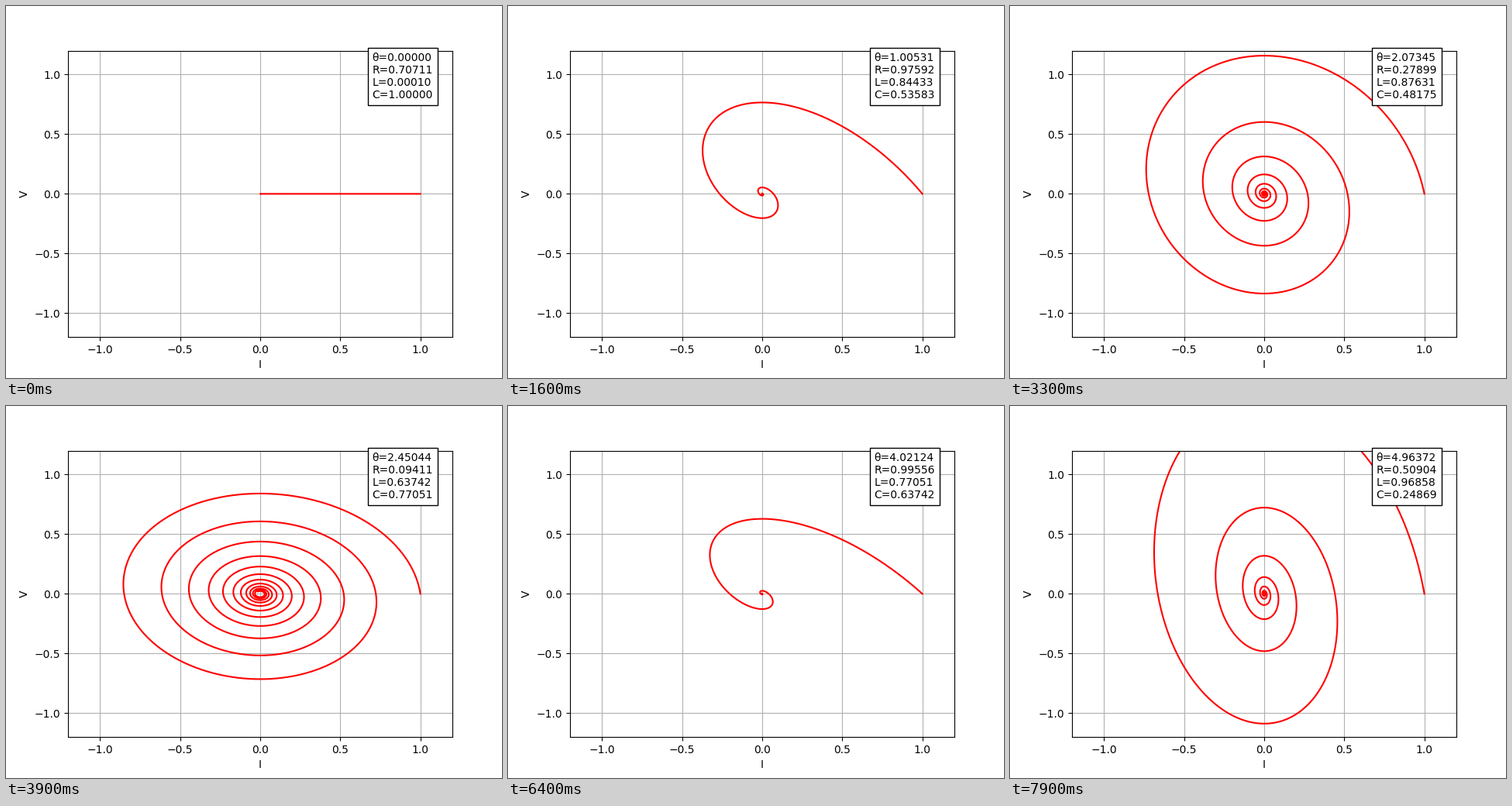
A matplotlib script that plays this animation: 640x480 px, repeating every 8000 ms.

```python
import numpy as np
import matplotlib.pyplot as plt
from matplotlib.animation import FuncAnimation

FRAMES = 80
INTERVAL = 100
STEP = 2 * np.pi / 100
FLOOR = 1e-4

t = np.arange(0, 50, 0.01)


def params(theta):
    """Resistance, inductance and capacitance for a given angle."""
    values = np.sin(theta + np.pi / 4), np.sin(theta), np.cos(theta)
    return [max(abs(v), FLOOR) for v in values]


def response(R, L, C):
    """Current and capacitor voltage of a series RLC circuit, I(0)=1, V(0)=0."""
    alpha = R / (2 * L)
    d = np.sqrt(complex(alpha**2 - 1 / (L * C)))
    r1, r2 = -alpha + d, -alpha - d
    e1, e2 = np.exp(r1 * t), np.exp(r2 * t)
    current = (r1 * e1 - r2 * e2) / (r1 - r2)
    voltage = (e1 - e2) / (C * (r1 - r2))
    return current.real, voltage.real


fig, ax = plt.subplots(figsize=(6.4, 4.8), dpi=100)
ax.set(xlim=(-1.2, 1.2), ylim=(-1.2, 1.2), xlabel="I", ylabel="V")
ax.grid()
curve, = ax.plot([], [], color="red", lw=1.5)
label = ax.text(0.7, 0.8, "", bbox=dict(facecolor="white", edgecolor="black"))


def update(i):
    theta = i * STEP
    R, L, C = params(theta)
    curve.set_data(*response(R, L, C))
    label.set_text(f"θ={theta:.5f}\nR={R:.5f}\nL={L:.5f}\nC={C:.5f}")
    return curve, label


anim = FuncAnimation(fig, update, frames=FRAMES, interval=INTERVAL,
                     repeat=True, repeat_delay=0)
plt.show()
```
